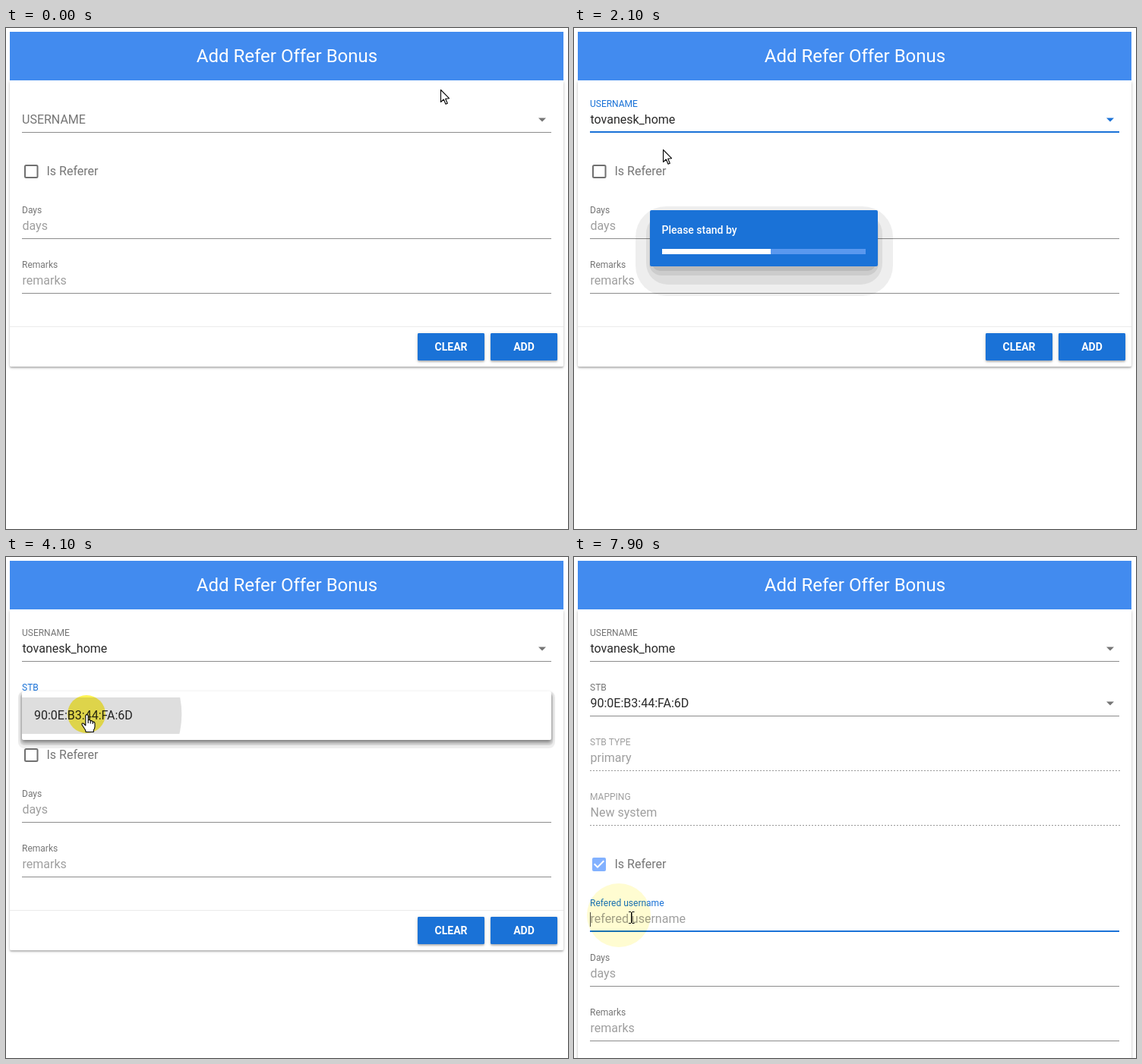
Recreate the animation shown at these times as an HTML page with a canvas. Size 740 by 660 pixels, loop 8000 ms.

```html
<!DOCTYPE html>
<html lang="en">
<head>
<meta charset="utf-8">
<title>Add Refer Offer Bonus</title>
<style>
  html, body { margin: 0; width: 100%; height: 100%; overflow: hidden; background: #fff; }
  canvas { display: block; }
</style>
</head>
<body>
<canvas id="stage" width="740" height="660"></canvas>
<script>
const ctx = document.getElementById('stage').getContext('2d');
const LOOP = 8000, STEP = 100;
const BLUE = '#1a72d7', HEADER = '#428bef', ACCENT = '#82b1ff';
const black = a => `rgba(0,0,0,${a})`;
const clamp = v => Math.max(0, Math.min(1, v));
const mix = (a, b, p) => a + (b - a) * p;
const progress = (t, from, to) => clamp((t - from) / (to - from));

const QUERY = 'tovanesk';
const USER = QUERY + '_home';
const STB = '90:0E:B3:44:FA:6D';
const ENDINGS = ['_home', 'evota', 'evota01_wbanel', 'evota03', 'evota09', 'evota1'];

// Pointer keys: time, x, y, shape
const POINTER = [
  [0, 572, 81, 'arrow'], [400, 117, 119, 'arrow'], [500, 117, 120, 'beam'],
  [1100, 117, 120, 'beam'], [1200, 117, 130, 'arrow'], [1500, 117, 160, 'hand'],
  [2000, 117, 160, 'arrow'], [2500, 117, 160, 'arrow'], [2900, 106, 192, 'hand'],
  [3300, 106, 192, 'hand'], [3400, 106, 200, 'hand'], [3500, 106, 207, 'hand'],
  [5300, 106, 207, 'hand'], [5400, 100, 232, 'arrow'], [6100, 58, 404, 'arrow'],
  [6200, 58, 404, 'hand'], [6800, 58, 404, 'hand'], [6900, 58, 421, 'arrow'],
  [7200, 59, 472, 'arrow'], [7300, 59, 472, 'beam'], [8000, 59, 472, 'beam']
];
// Clicks: time, x, y
const CLICKS = [[500, 117, 120], [1600, 117, 160], [3000, 106, 192],
  [4100, 106, 207], [6300, 58, 404], [7600, 59, 472]];

const SHAPES = {
  arrow: new Path2D('M.5 .5V16.5L4.3 13L7 19.3L9.3 18.3L6.7 12.2L11.5 11.7Z'),
  hand: new Path2D('M-1.2 1.8Q.5 -.6 2.2 1.8V8Q4.5 6.6 5.2 9Q7.3 7.8 8.2 10.2' +
    'Q10.8 9.6 11 12.5V16.5Q11 19 9.3 21V23.5H-.8Q-1 21 -3 18.5L-6 14Q-6.4 11.4 -4 12.2L-1.2 15Z' +
    'M2.2 8V12M5.2 9V12.5M8.2 10.2V13')
};
const TICK = new Path2D('M10 17L5 12L6.41 10.58L10 14.17L17.59 6.58L19 8Z');

function rect(x, y, w, h, color, radius = 0) {
  ctx.fillStyle = color;
  ctx.beginPath();
  ctx.roundRect(x, y, w, h, radius);
  ctx.fill();
}

function text(str, x, y, color, size = 16, weight = 400, align = 'left') {
  ctx.font = `${weight} ${size}px Roboto, sans-serif`;
  ctx.textAlign = align;
  ctx.fillStyle = color;
  ctx.fillText(str, x, y);
}

function raised(x, y, w, h, color) {
  for (const [dy, blur, alpha] of [[2, 2, .2], [1, 5, .16]]) {
    ctx.save();
    ctx.shadowColor = black(alpha);
    ctx.shadowOffsetY = dy;
    ctx.shadowBlur = blur;
    rect(x, y, w, h, color, 2);
    ctx.restore();
  }
}

function triangle(x, y, up, color) {
  const d = up ? -2.5 : 2.5;
  ctx.fillStyle = color;
  ctx.beginPath();
  ctx.moveTo(x - 5, y - d);
  ctx.lineTo(x + 5, y - d);
  ctx.lineTo(x, y + d);
  ctx.fill();
}

// A text field whose underline sits at y
function field(y, o) {
  const { label, value = '', hint = '', float = 1, focus, hover, disabled, arrow, open } = o;
  const labelColor = focus ? BLUE : black(disabled ? .38 : .54);
  text(label, 21, y - mix(11, 33, float), labelColor, mix(16, 12, float));
  if (value) text(value, 21.5, y - 11, black(disabled ? .38 : .84));
  else if (hint) text(hint, 21.5, y - 11, black(.38));
  if (disabled) for (let x = 21; x < 718; x += 4) rect(x, y, 2, 1, black(.4));
  else if (focus) rect(21, y - 1, 697, 2, BLUE);
  else rect(21, y, 697, 1, black(hover ? .87 : .45));
  if (arrow) triangle(706, y - 16, open, focus ? BLUE : black(.54));
}

function checkbox(y, checked) {
  if (checked) {
    rect(24, y - 9, 18, 18, ACCENT, 2);
    ctx.save();
    ctx.translate(21, y - 12);
    ctx.fillStyle = '#fff';
    ctx.fill(TICK);
    ctx.restore();
  } else {
    ctx.strokeStyle = black(.56);
    ctx.lineWidth = 2;
    ctx.beginPath();
    ctx.roundRect(25, y - 8, 16.5, 16, 1.5);
    ctx.stroke();
  }
  text('Is Referer', 53.5, y + 5, black(.54));
}

function button(label, x, y) {
  raised(x, y, 88, 36, BLUE);
  text(label, x + 44, y + 23, '#fff', 14, 700, 'center');
}

function form(t) {
  const extra = t < 2200 ? 0 : t < 5000 ? 1 : 3;
  const checked = t >= 6300, referred = t >= 6400;
  const top = extra * 72, low = top + (referred ? 72 : 0);

  raised(5, 69, 729, 377 + low, '#fff');
  rect(5, 5, 729, 64, HEADER);
  text('Add Refer Offer Bonus', 370, 45, '#fff', 24, 400, 'center');

  const typed = QUERY.slice(0, Math.max(0, (t - 500) / 50));
  field(137, { label: 'USERNAME', value: t < 2000 ? typed : USER, arrow: true,
    float: progress(t, 400, 700), focus: t >= 500 && t < 3000, open: t >= 700 && t < 2000 });
  if (extra) field(209, { label: 'STB', value: t < 4500 ? '' : STB, arrow: true,
    float: progress(t, 2900, 3200), focus: t >= 3000 && t < 6300, open: t >= 3000 && t < 4500 });
  if (extra === 3) {
    field(281, { label: 'STB TYPE', value: 'primary', disabled: true });
    field(353, { label: 'MAPPING', value: 'New system', disabled: true });
  }
  checkbox(189 + top, checked);
  if (referred) {
    field(493, { label: 'Refered username', hint: 'refered username', focus: t >= 7600, hover: t >= 7300 });
    if (t >= 7600) rect(21, 468, 1, 19, black(.7));
  }
  field(277 + low, { label: 'Days', hint: 'days' });
  field(349 + low, { label: 'Remarks', hint: 'remarks' });
  rect(5, 393 + low, 729, 1, black(.08));
  button('CLEAR', 542, 402 + low);
  button('ADD', 638, 402 + low);
}

function ripple(t, start, x, y, rowTop) {
  const age = t - start;
  if (age < 0 || age > 400) return;
  const p = age === 0 ? .04 : 1 - (1 - clamp(age / 300)) ** 3;
  ctx.save();
  ctx.beginPath();
  ctx.rect(21, rowTop, 697, 48);
  ctx.clip();
  ctx.fillStyle = black(.13 * (1 - progress(age, 200, 500)));
  ctx.beginPath();
  ctx.arc(mix(x, 369.5, p), mix(y, rowTop + 24, p), mix(105, 350, p), 0, 7);
  ctx.fill();
  ctx.restore();
}

function menu(y, h, alpha, drawItems) {
  if (alpha <= 0) return;
  ctx.save();
  ctx.globalAlpha = alpha;
  rect(16, y, 707, h + 11, black(.065), 8);
  rect(19, y + 3, 701, h + 4, black(.07), 5);
  ctx.save();
  ctx.shadowColor = black(.45);
  ctx.shadowOffsetY = 3;
  ctx.shadowBlur = 5;
  rect(21, y, 697, h, '#fff', 2);
  ctx.restore();
  drawItems();
  ctx.restore();
}

function menus(t) {
  const fade = (from, to) => Math.min(progress(t, from - 100, from + 100), 1 - progress(t, to - 200, to));
  menu(138, 300, fade(700, 2000), () => {
    const typed = QUERY.slice(0, Math.max(0, (t - 500) / 50));
    ENDINGS.forEach((ending, i) => {
      const y = 146 + i * 48;
      ctx.font = '16px Roboto, sans-serif';
      const w = ctx.measureText(typed).width;
      rect(37, y + 14, w, 17, '#eee');
      text(typed, 37, y + 29, '#9e9e9e');
      text(QUERY.slice(typed.length) + ending, 37 + w, y + 29, black(.84));
    });
    ripple(t, 1600, 117, 160, 146);
    rect(703, 155, 13, 161, '#c3cecd');
    ctx.save();
    ctx.translate(709.5, 0);
    ctx.scale(.8, .8);
    triangle(0, 184, true, '#a3a3a3');
    triangle(0, 536.5, false, '#505050');
    ctx.restore();
  });
  menu(177, 64, fade(3100, 4500), () => {
    text(STB, 37, 214, black(.84));
    ripple(t, 4100, 106, 207, 185);
  });
}

function dialog(t, start, closing) {
  if (t < start || t > closing) return;
  ctx.save();
  ctx.translate(250, 277);
  if (t === closing) {
    ctx.globalAlpha = .09;
    ctx.scale(.56, .56);
  } else {
    rect(-169, -42, 339, 118, black(.065), 40);
    rect(-155, -34, 311, 95, black(.07), 28);
    rect(-151, -30, 302, 79, black(.08), 16);
    rect(-147, -26, 294, 69, black(.09), 10);
  }
  rect(-150, -37, 300, 74, BLUE, 2);
  text('Please stand by', -134.5, -6, '#fff', 14, 500);
  rect(-134, 14, 268, 7, '#5a98ee');
  const width = t === closing ? 268 : Math.min(268, 143 + (t - start) * .4);
  rect(-134, 14, width, 7, '#fff');
  ctx.restore();
}

function clicks(t) {
  ctx.save();
  ctx.globalCompositeOperation = 'multiply';
  for (const [start, x, y] of CLICKS) {
    const p = (t - start) / 300;
    if (p < 0 || p > 1) continue;
    ctx.fillStyle = `rgba(255,243,70,${mix(.92, .25, p)})`;
    ctx.beginPath();
    ctx.arc(x, y, mix(25, 42, p), 0, 7);
    ctx.fill();
  }
  ctx.restore();
}

function pointer(t) {
  const i = POINTER.findLastIndex(key => key[0] <= t);
  const a = POINTER[i], b = POINTER[i + 1] || a;
  const p = progress(t, a[0], b[0] + (a === b));
  const x = Math.round(mix(a[1], b[1], p)), y = Math.round(mix(a[2], b[2], p));
  ctx.save();
  ctx.lineWidth = 1.1;
  ctx.lineJoin = 'round';
  ctx.strokeStyle = '#000';
  ctx.fillStyle = '#fff';
  if (a[3] === 'beam') {
    ctx.translate(x + 17, y + 3);
    rect(-1, -7, 1.5, 14, '#000');
    rect(-4, -8, 3, 1, '#000');
    rect(.5, -8, 3, 1, '#000');
    rect(-4, 7, 3, 1, '#000');
    rect(.5, 7, 3, 1, '#000');
  } else {
    ctx.translate(x, y);
    ctx.fill(SHAPES[a[3]]);
    ctx.stroke(SHAPES[a[3]]);
  }
  ctx.restore();
}

function draw(now) {
  const t = Math.floor((now % LOOP) / STEP) * STEP;
  ctx.fillStyle = '#fff';
  ctx.fillRect(0, 0, 740, 660);
  form(t);
  menus(t);
  dialog(t, 2100, 2200);
  dialog(t, 4600, 5000);
  clicks(t);
  pointer(t);
}

const begin = performance.now();
function frame() {
  draw(performance.now() - begin);
  requestAnimationFrame(frame);
}
frame();
</script>
</body>
</html>
```
